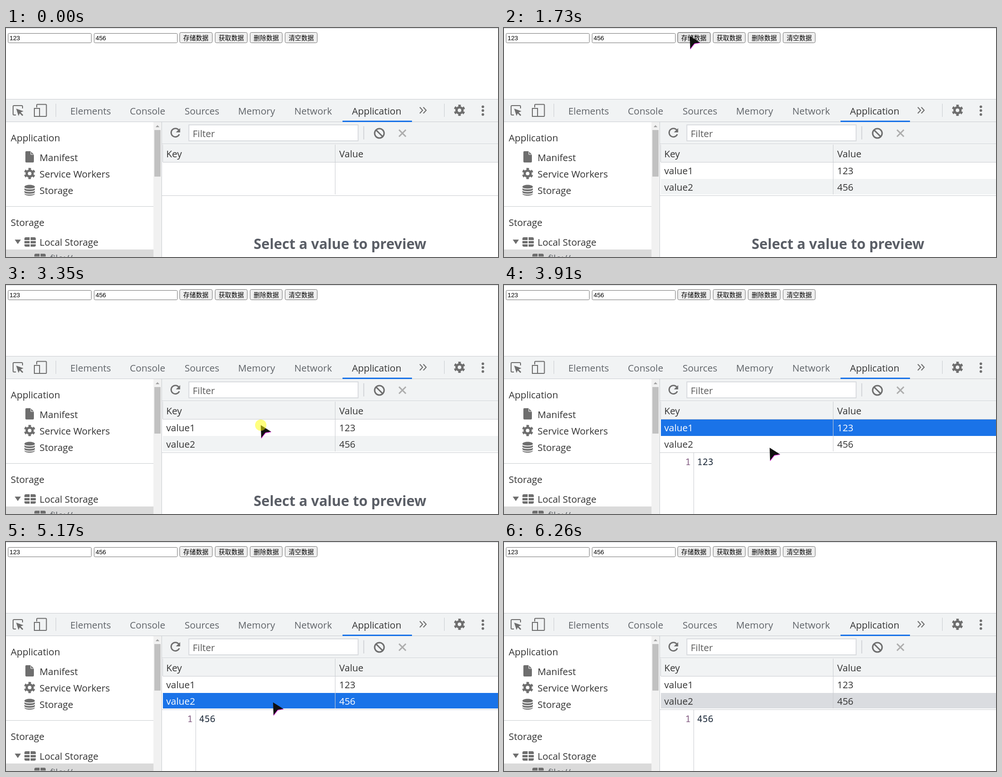
An HTML page that plays this animation: 1041x487 px, repeating every 6330 ms.

```html
<!DOCTYPE html>
<html lang="zh-CN">
<head>
<meta charset="utf-8">
<title>Storage demo</title>
<style>
  html, body { margin: 0; width: 100%; height: 100%; overflow: hidden; background: #fff; }
  svg { display: block; width: 100%; height: 100%; }
  text { font: 20px "Open Sans", "Noto Sans", sans-serif; fill: #333; white-space: pre; }
  .tab { fill: #5f6368; }
  .field { font: 13.33px "Liberation Sans", sans-serif; fill: #000; }
  .label { font: 13.33px "Noto Sans CJK SC", "Noto Sans CJK", sans-serif; fill: #000; }
  .hint { font-size: 29.6px; font-weight: 700; fill: #5a5e66; }
  .code { font: 19.2px "Noto Sans Mono", monospace; fill: #1b2838; }
  .icon { fill: #6e6e6e; }
  .line { fill: none; stroke: #6e6e6e; }
  .rule { fill: none; stroke: #cacdd1; }
  .button rect { fill: #efefef; stroke: #767676; }
  .button.hover rect { fill: #e5e5e5; stroke: #4f4f4f; }
  .row.active rect { fill: #1a73e8; }
  .row.active text { fill: #fff; }
  .row.idle rect { fill: #dadce0; }
</style>
</head>
<body>
<svg viewBox="0 0 1041 487">
  <defs>
    <g id="gear" class="line">
      <circle r="6.3" stroke-width="5"/>
      <circle r="9.8" stroke-width="4.4" stroke-dasharray="5.13" transform="rotate(75)"/>
    </g>
    <g id="grid" class="icon">
      <path d="M0 6V3Q0 0 3 0H11V6ZM13 0H21Q24 0 24 3V6H13ZM0 8H11V13H0ZM13 8H24V13H13ZM0 15H11V20H3Q0 20 0 17ZM13 15H24V17Q24 20 21 20H13Z"/>
    </g>
  </defs>

  <path class="rule" d="M0 .5H1041"/>
  <g id="form"></g>

  <!-- panel tabs -->
  <path fill="#f1f3f4" d="M0 152H1041V200H0ZM330 200H1041V246H330ZM332 248H1041V285H332Z"/>
  <path class="rule" d="M0 151.5H1041M0 199.5H1041M105.5 161V189M927.5 161V189"/>
  <path fill="#1a73e8" d="M712 197H859V200H712Z"/>
  <g id="tabs"></g>
  <path class="line" stroke-width="2" d="M21 185H17Q15 185 15 183V167Q15 165 17 165H33Q35 165 35 167V171"/>
  <path class="icon" d="M21.5 171.5L37 177L31 179.5L36.5 185L34.5 187L29 181.5L26.5 187Z"/>
  <path class="line" stroke-width="2" d="M65 169V164Q65 162.5 66.5 162.5H84Q85.500 162.500 85.500 164V186.500Q85.500 188 84 188H72M60 171H71V188H60Z"/>
  <path class="line" stroke-width="2" d="M875.500 168.500L881.500 175L875.500 181.500M883 168.500L889 175L883 181.500"/>
  <use href="#gear" x="959.5" y="175"/>
  <g class="icon">
    <circle cx="1009" cy="167.500" r="2.700"/><circle cx="1009" cy="175.500" r="2.700"/><circle cx="1009" cy="184" r="2.700"/>
  </g>

  <!-- sidebar -->
  <path fill="#dadada" d="M0 471H312V487H0Z"/>
  <path fill="#f1f1f1" d="M312 200H329V487H312Z"/>
  <path fill="#c1c1c1" d="M314 217H327V316H314Z"/>
  <path fill="#a3a3a3" d="M316.500 211L320.500 206.500L324.500 211Z"/>
  <path class="rule" d="M0 379.500H312M329.500 200V487"/>
  <path class="icon" d="M43 262H52L59 269V284Q59 286 57 286H43Q41 286 41 284V264Q41 262 43 262Z"/>
  <path stroke="#fff" fill="none" d="M52.500 262V269H59"/>
  <use href="#gear" x="50" y="309.500"/>
  <path class="icon" d="M39 338C39 332 61 332 61 338V352C61 358 39 358 39 352Z"/>
  <path fill="none" stroke="#fff" stroke-width="1.700" d="M39 339C39 343.500 61 343.500 61 339M39 344.500C39 349 61 349 61 344.500M39 350C39 354.500 61 354.500 61 350"/>
  <path class="icon" d="M18.500 450H31.500L25 459.500Z"/>
  <use href="#grid" x="39" y="445"/>
  <use href="#grid" x="60" y="480"/>
  <g id="sidebar"></g>

  <!-- table toolbar -->
  <path fill="#fff" stroke="#dadce0" stroke-width="2" d="M387 206H745V240H387Z"/>
  <text x="395" y="232" fill-opacity=".8">Filter</text>
  <path class="rule" stroke-width="1.500" d="M757 209V237"/>
  <path class="line" stroke-width="2.700" d="M365.500 217A9 9 0 1 0 366.700 226"/>
  <path class="icon" d="M368.500 213V222H359.500Z"/>
  <g class="line" stroke-width="3"><circle cx="790" cy="224" r="10"/><path d="M783 217L797 231"/></g>
  <path fill="none" stroke="#adadad" stroke-width="3" d="M831.500 216.500L846 231M846 216.500L831.500 231"/>

  <text x="339" y="275">Key</text>
  <text x="705" y="275">Value</text>
  <g id="rows"></g>
  <path class="rule" d="M330 246.500H1041M331.500 248V285M332 285.500H1041M696.500 248V354M330 356.500H1041"/>

  <text id="hint" class="hint" x="524" y="470">Select a value to preview</text>
  <g id="preview">
    <path class="rule" d="M401.500 357V487"/>
    <text class="code" x="383.500" y="383" style="fill:#80587f">1</text>
    <text id="content" class="code" x="408.500" y="383"></text>
  </g>

  <g id="cursor">
    <path fill="#111" d="M0 0L22 14L10 16L1 28Z"/>
    <path fill="none" stroke="#e010e0" stroke-width="1.200" d="M1 28L10 16.500L22 14.500"/>
  </g>
  <circle id="click" r="12" fill="#ff0" fill-opacity=".5"/>
</svg>

<script>
const LOOP = 6330, STEP = 70, LEAD = 130;
const $ = id => document.getElementById(id);
const text = (x, y, label, cls = "") => `<text x="${x}" y="${y}" class="${cls}">${label}</text>`;

$("form").innerHTML =
  [[4, 123], [186, 456]].map(([x, value]) =>
    `<rect x="${x + .5}" y="11.5" width="176" height="20" rx="2" fill="#fff" stroke="#767676"/>` +
    text(x + 3.5, 26, value, "field")).join("") +
  [[367, 70, "存储数据"], [442, 69, "获取数据"], [516, 69, "删除数据"], [590, 69, "清空数据"]].map(([x, w, label]) =>
    `<g class="button"><rect x="${x + .5}" y="9.5" width="${w - 1}" height="22" rx="3"/>` +
    text(x + 8, 25.5, label, "label") + "</g>").join("");

$("tabs").innerHTML =
  [[136, "Elements"], [262, "Console"], [378, "Sources"], [491, "Memory"], [610, "Network"]]
    .map(([x, label]) => text(x, 184, label, "tab")).join("") + text(732, 184, "Application");

$("sidebar").innerHTML =
  [[10, 241, "Application"], [71, 283, "Manifest"], [71, 318, "Service Workers"], [71, 353, "Storage"],
   [10, 421, "Storage"], [71, 463, "Local Storage"]].map(item => text(...item)).join("") +
  text(93, 497, "file://", "tab");

$("rows").innerHTML = [[286, 35, "value1", 123], [321, 33, "value2", 456]].map(([y, h, key, value]) =>
  `<g class="row"><rect x="332" y="${y}" width="709" height="${h}" fill="#fff"/>` +
  text(339, y + 25, key) + text(705, y + 25, value) + "</g>").join("");

const saveButton = document.querySelector(".button");
const rows = [...document.querySelectorAll(".row")];

// Pointer tip: [ms, x, y]
const path = [
  [130, 882, 452], [200, 740, 330], [270, 578, 205], [340, 500, 82], [410, 440, 45], [550, 393, 17],
  [2710, 393, 17], [2780, 398, 45], [2850, 410, 102], [2920, 430, 155], [2990, 470, 208],
  [3060, 520, 275], [3130, 539, 298], [3420, 539, 298], [3490, 541, 313],
  [3630, 552, 330], [3770, 562, 346], [4260, 562, 346], [4400, 565, 341],
  [5380, 565, 341], [5450, 556, 347], [5520, 590, 362], [5590, 626, 372], [5660, 831, 451]
];
const clicks = [[1040, 1180], [3280, 3490], [4470, 4680]];
const SAVED = 1110, FIRST = 3420, SECOND = 4610, BLUR = 6260;

function pointAt(t) {
  const i = path.findIndex(p => p[0] >= t);
  if (i < 1) return path[0].slice(1);
  const [t0, x0, y0] = path[i - 1], [t1, x1, y1] = path[i];
  const k = (t - t0) / (t1 - t0);
  return [x0 + (x1 - x0) * k, y0 + (y1 - y0) * k];
}

const show = (el, on) => { el.style.display = on ? "" : "none"; };

function draw(time) {
  const t = time < LEAD ? 0 : LEAD + Math.floor((time - LEAD) / STEP) * STEP;
  const visible = t >= LEAD && t < 5730;
  const [x, y] = pointAt(t);
  show($("cursor"), visible);
  $("cursor").setAttribute("transform", `translate(${x} ${y})`);
  show($("click"), clicks.some(([from, to]) => t >= from && t < to));
  $("click").setAttribute("transform", `translate(${x} ${y})`);
  saveButton.classList.toggle("hover", visible && x > 367 && x < 437 && y > 9 && y < 32);

  const selected = t >= SECOND ? 1 : t >= FIRST ? 0 : -1;
  rows.forEach((row, i) => {
    show(row, t >= SAVED);
    row.classList.toggle("active", i === selected && time < BLUR);
    row.classList.toggle("idle", i === selected && time >= BLUR);
  });
  rows[1].firstChild.setAttribute("fill", selected < 0 ? "#f1f3f4" : "#fff");
  show($("hint"), selected < 0);
  show($("preview"), selected >= 0);
  $("content").textContent = selected === 1 ? "456" : "123";
}

const start = performance.now();
function tick() {
  draw((performance.now() - start) % LOOP);
  requestAnimationFrame(tick);
}
tick();
</script>
</body>
</html>
```
